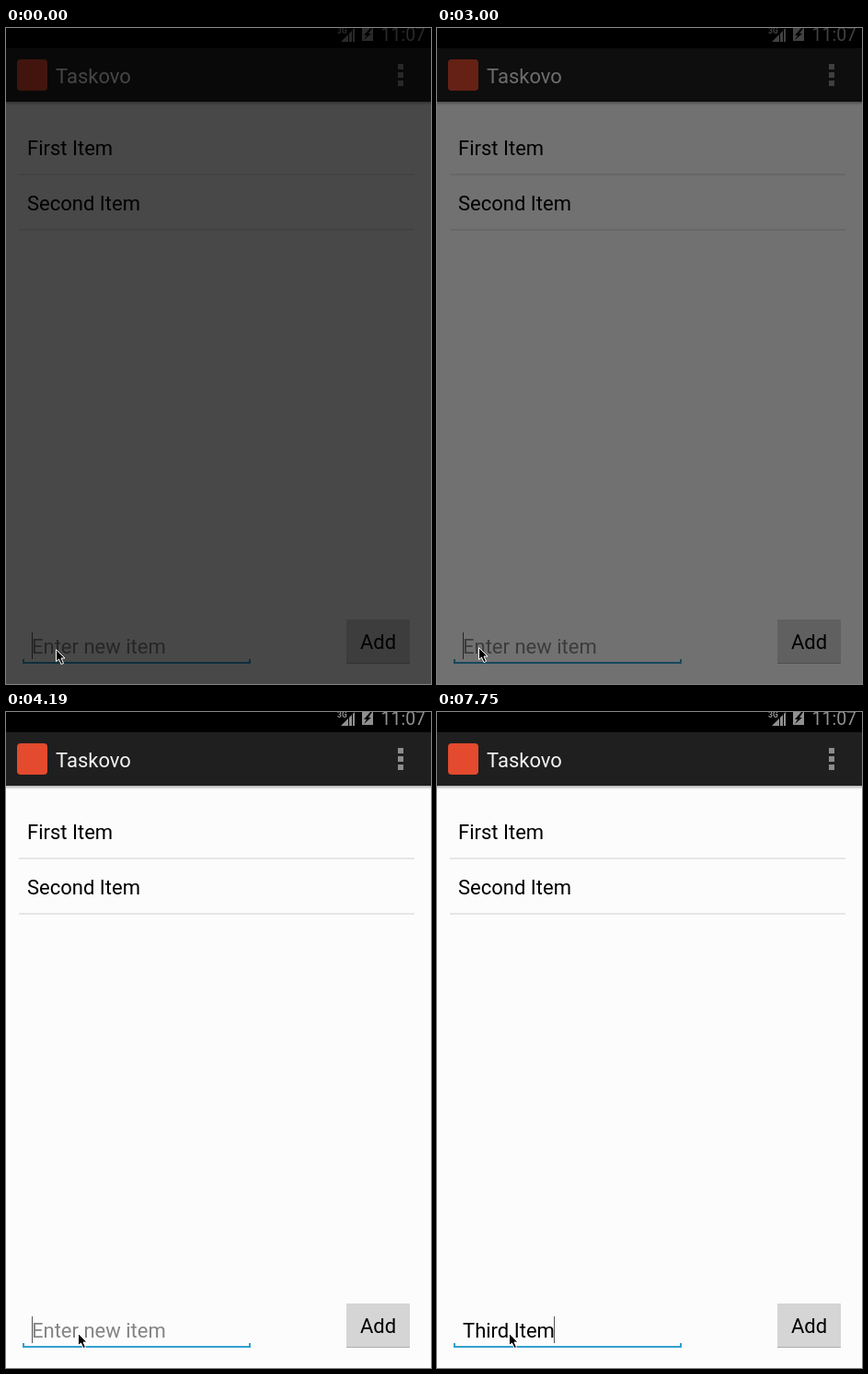
These frames come from a looping animation (462x712 px, 8 s). An HTML page:

```html
<!DOCTYPE html>
<html lang="en">
<head>
<meta charset="utf-8">
<title>To-do list</title>
<style>
  html, body { margin: 0; width: 100%; height: 100%; overflow: hidden; background: #fcfcfc; }
  svg { display: block; width: 462px; height: 712px; }
  text { font: 22px Roboto, sans-serif; white-space: pre; }
  .status { fill: #909090; }
  .clock { font-size: 19.5px; }
  .network { font-size: 8.5px; font-weight: 700; }
</style>
</head>
<body>
<svg viewBox="0 0 462 712">
  <defs>
    <linearGradient id="shadow" x2="0" y2="1">
      <stop stop-color="#000" stop-opacity=".3"/>
      <stop offset="1" stop-color="#000" stop-opacity="0"/>
    </linearGradient>
  </defs>
  <rect width="462" height="712" fill="#fcfcfc"/>

  <!-- status bar -->
  <rect width="462" height="22"/>
  <g class="status">
    <text class="network" x="360" y="6">3G</text>
    <path d="M364 15L372 7V15Z"/>
    <path d="M373 6L376 3V15H373ZM377 2L379 0V15H377Z"/>
    <path d="M387 0H399V14H387Z"/>
    <path d="M396 0L389 8H392L389 13L397 6H394L398 0Z" fill="#000"/>
    <text class="clock" x="407.5" y="14">11:07</text>
  </g>

  <!-- action bar -->
  <rect y="22" width="462" height="58" fill="#1f1f1f"/>
  <rect y="80" width="462" height="4" fill="url(#shadow)"/>
  <rect x="12" y="34" width="33" height="34" rx="4" fill="#e34a2e"/>
  <text x="54" y="60" fill="#f3f3f3">Taskovo</text>
  <path d="M426 39h6v6h-6zM426 48h6v6h-6zM426 57h6v6h-6z" fill="#8c8c8c"/>

  <!-- list -->
  <text x="23" y="138">First Item</text>
  <text x="23" y="198">Second Item</text>
  <path d="M14 158h430v2H14zM14 218h430v2H14z" fill="#e6e6e6"/>

  <!-- input row -->
  <text id="entry" x="28" y="679"></text>
  <rect id="caret" y="656" width="1" height="29" fill="#555"/>
  <path d="M18 685h2v3h244v-3h2v5H18z" fill="#33a0cf"/>
  <rect x="370" y="642" width="69" height="48" fill="#d5d5d5"/>
  <rect x="370" y="689" width="69" height="1" fill="#adadad"/>
  <text x="385" y="674">Add</text>

  <rect id="dim" width="462" height="712"/>
  <path id="pointer" d="M0 0V13L3 10.5L5.5 16L8 15L5.5 9.5H9.5Z" stroke="#fff" stroke-width="1"/>
</svg>
<script>
const LOOP = 8000;
const [entry, caret, dim, pointer] =
  ["entry", "caret", "dim", "pointer"].map(id => document.getElementById(id));

const dimming = [[0, .714], [3000, .55], [3150, .31], [3300, 0]];
const blinking = [[0, 1], [150, 0], [600, 1], [1200, 0], [1650, 1], [2100, 0],
  [2700, 1], [3590, 0], [4190, 1], [5230, 0], [5520, 1], [6710, 0], [7150, 1]];
// time and number of characters typed
const typing = [[0, 0], [4480, 1], [4630, 2], [5380, 3], [5520, 4], [5970, 5],
  [6260, 6], [7150, 7], [7300, 8], [7600, 9], [7750, 10]];
const moves = [
  { first: 150, last: 600, steps: 4, to: [89, 544] },
  { first: 900, last: 900, steps: 1, to: [90, 545] },
  { first: 1200, last: 2100, steps: 7, to: [45, 672] },
  { first: 3450, last: 3590, steps: 2, to: [77.5, 674] }
];

const valueAt = (track, t) => track.findLast(([time]) => time <= t)[1];

// eased travel, sampled at evenly spaced screen updates
function progress({ first, last, steps }, t) {
  if (t < first) return 0;
  if (t >= last) return 1;
  const step = Math.floor((t - first) / (last - first) * (steps - 1)) + 1;
  const p = step / steps;
  return p * p * (3 - 2 * p);
}

function pointerAt(t) {
  let [x, y] = [53.5, 674];
  for (const move of moves) {
    const p = progress(move, t);
    x += (move.to[0] - x) * p;
    y += (move.to[1] - y) * p;
  }
  return [Math.round(x) + .5, Math.round(y) + .5];
}

function draw(now) {
  const t = now % LOOP;
  const typed = "Third Item".slice(0, valueAt(typing, t));
  entry.textContent = typed || "Enter new item";
  entry.setAttribute("fill", typed ? "#000" : "#848484");
  const width = typed ? entry.getComputedTextLength() : 0;
  caret.setAttribute("x", Math.floor(28 + width));
  caret.setAttribute("opacity", valueAt(blinking, t));
  dim.setAttribute("opacity", valueAt(dimming, t));
  pointer.setAttribute("transform", `translate(${pointerAt(t)})`);
}

const start = performance.now();
function tick() {
  draw(performance.now() - start);
  requestAnimationFrame(tick);
}
tick();
</script>
</body>
</html>
```
